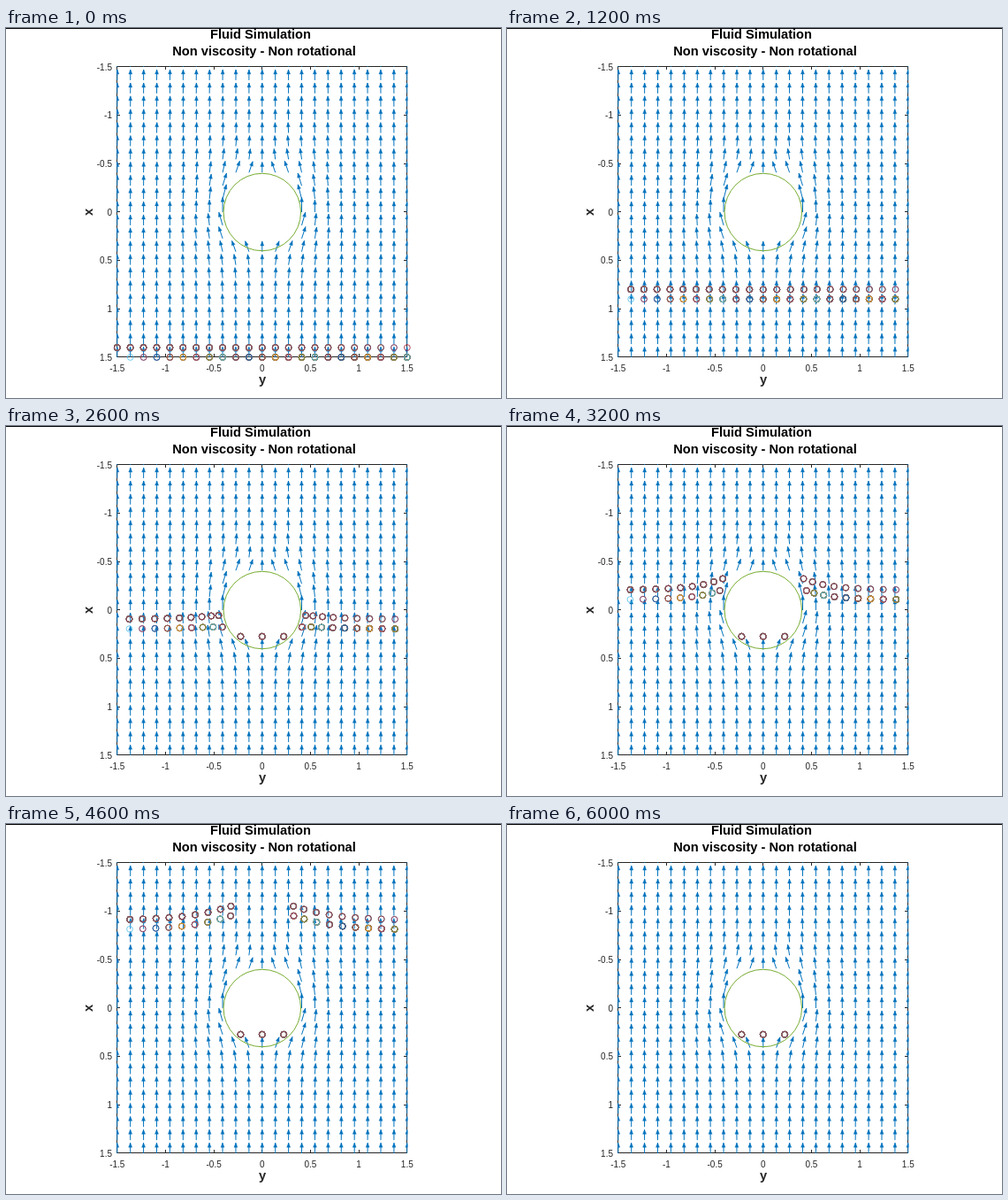
An HTML page with a canvas for the animation above (6200 ms loop, 560 px wide and 418 px high).

```html
<!DOCTYPE html>
<html lang="en">
<head>
<meta charset="utf-8">
<title>Fluid Simulation</title>
<style>
  html, body { margin: 0; width: 100%; height: 100%; overflow: hidden; background: #fff; }
  svg, canvas { position: absolute; left: 0; top: 0; }
  text { font-family: "Liberation Sans", Arial, sans-serif; font-size: 10px; fill: #262626; text-anchor: middle; }
  .bold { font-size: 14.67px; font-weight: bold; fill: #000; }
  .label { font-size: 14.67px; font-weight: bold; }
  .end { text-anchor: end; }
</style>
</head>
<body>
<svg id="plot" width="560" height="418">
  <defs><clipPath id="area"><rect x="125" y="43" width="329.5" height="329.5"/></clipPath></defs>
  <rect width="560" height="1"/>
  <text class="bold" x="288" y="12">Fluid Simulation</text>
  <text class="bold" x="292" y="31">Non viscosity - Non rotational</text>
  <text class="label" x="290" y="402">y</text>
  <text class="label" transform="translate(98 208) rotate(-90)">x</text>
  <g id="ticks"></g>
  <path id="axes" fill="none" stroke="#262626"/>
  <g clip-path="url(#area)" stroke="#0072bd">
    <path id="stems" fill="none" stroke-width="1"/>
    <path id="heads" fill="#0072bd" stroke-width=".4"/>
  </g>
  <circle id="body" fill="none" stroke="#77ac30"/>
</svg>
<canvas id="dots" width="560" height="418"></canvas>
<script>
const $ = id => document.getElementById(id);
const SCALE = 328 / 3, CX = 289.8, CY = 208, R = 0.4;
const COUNT = 23, FRAMES = 31, FRAME_MS = 200, STEP = 0.1, ARROW = 11.8;
const COLORS = ['#4dbeee', '#a2142f', '#0072bd', '#d95319', '#edb120', '#7e2f8e', '#77ac30'];
const px = x => CX + x * SCALE;
const py = y => CY + y * SCALE;
const grid = Array.from({ length: COUNT }, (_, i) => -1.5 + 3 * i / (COUNT - 1));

// Stream around a sphere, travelling towards negative y
function flow(x, y) {
  const r = Math.hypot(x, y), r5 = r ** 5;
  const lag = 1 - 0.8 * (y / r) * (R / r) ** 3;
  return [1.5 * R ** 3 * x * y / r5, -1 - 0.028 * x * x / r5 * lag];
}

function drawAxes() {
  const left = 125.5, top = 43.5, size = 328, right = left + size, bottom = top + size;
  let path = `M${left} ${top}h${size}v${size}h${-size}z`, labels = '';
  for (let v = -1.5; v <= 1.5; v += 0.5) {
    const x = Math.floor(px(v)) + 0.5, y = Math.floor(py(v) - 0.1) + 0.5;
    path += `M${x} ${top}v3.5M${x} ${bottom}v-3.5M${left} ${y}h3.5M${right} ${y}h-3.5`;
    labels += `<text x="${px(v)}" y="388">${v}</text><text class="end" x="120" y="${py(v) + 3.8}">${v}</text>`;
  }
  $('axes').setAttribute('d', path);
  $('ticks').innerHTML = labels;
}

function drawArrows() {
  let stems = '', heads = '';
  for (const gx of grid) for (const gy of grid) {
    if (Math.hypot(gx, gy) < R) continue;
    const [u, v] = flow(gx, gy), len = Math.hypot(u, v);
    const x = px(gx), y = py(gy), tx = x + u * ARROW, ty = y + v * ARROW;
    const ux = u / len, uy = v / len, bx = tx - ux * 5, by = ty - uy * 5;
    stems += `M${x} ${y}L${tx} ${ty}`;
    heads += `M${tx} ${ty}L${bx - uy * 2} ${by + ux * 2}L${bx + uy * 2} ${by - ux * 2}z`;
  }
  $('stems').setAttribute('d', stems);
  $('heads').setAttribute('d', heads);
}

// Particles that enter the body stay caught there
function advance([x, y]) {
  if (Math.hypot(x, y) < R - 0.001) return [x, y];
  const [u, v] = flow(x, y), nx = x + u * STEP, ny = y + v * STEP;
  return [nx, Math.hypot(nx, ny) < R - 0.001 ? 0.272 : ny];
}

const history = [grid.map(x => [x, 1.5])];
for (let i = 0; i < FRAMES; i++) history.push(history[i].map(advance));

const ctx = $('dots').getContext('2d');
ctx.lineWidth = 0.8;

// Each pass plots every particle once; only those up to the pass have moved
function drawDots(frame) {
  ctx.clearRect(0, 0, 560, 418);
  for (let pass = 0; pass < COUNT; pass++) {
    ctx.strokeStyle = COLORS[pass % COLORS.length];
    ctx.beginPath();
    for (let i = 0; i < COUNT; i++) {
      const [x, y] = history[frame + (i <= pass ? 1 : 0)][i];
      if (Math.max(Math.abs(x), Math.abs(y)) > 1.5008) continue;
      ctx.moveTo(px(x) + 3.4, py(y));
      ctx.arc(px(x), py(y), 3.4, 0, 2 * Math.PI);
    }
    ctx.stroke();
  }
}

drawAxes();
drawArrows();
$('body').setAttribute('cx', CX);
$('body').setAttribute('cy', CY);
$('body').setAttribute('r', R * SCALE);

const start = performance.now();
let shown = -1;
function tick() {
  const frame = Math.floor((performance.now() - start) / FRAME_MS) % FRAMES;
  if (frame !== shown) drawDots(shown = frame);
  requestAnimationFrame(tick);
}
tick();
</script>
</body>
</html>
```
